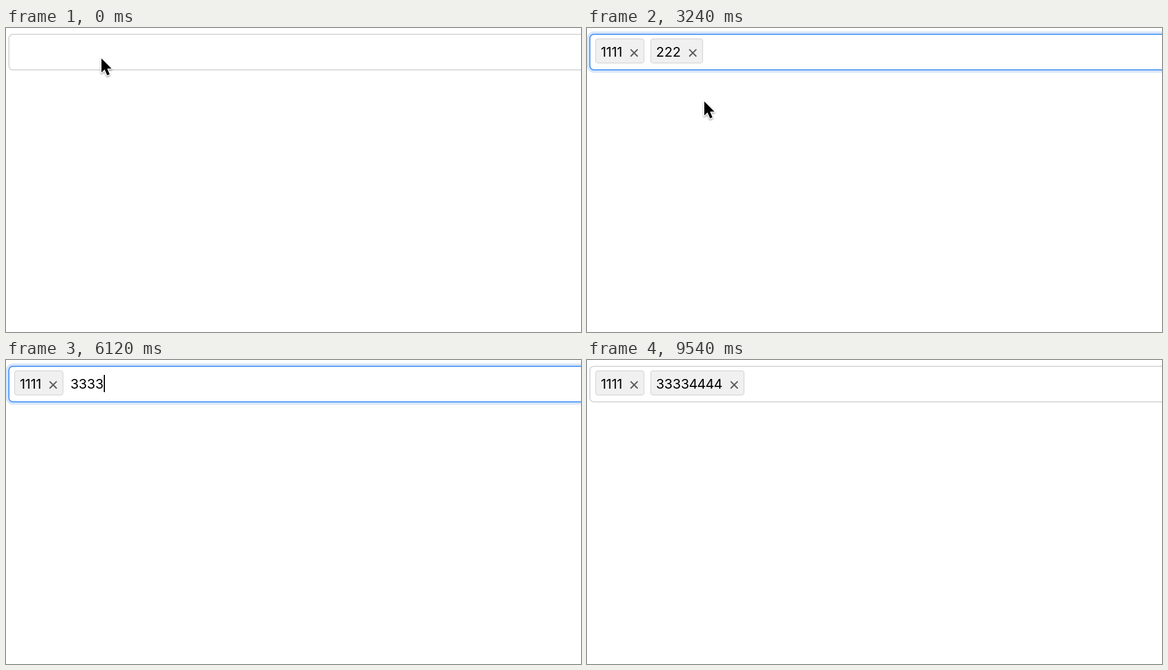
An HTML page that plays this animation: 1000x530 px, repeating every 9660 ms.

```html
<!DOCTYPE html>
<html lang="en">
<head>
<meta charset="utf-8">
<title>Tag input</title>
<style>
  html, body { margin: 0; width: 100%; height: 100%; overflow: hidden; background: #fff; }
  svg { display: block; }
  text { font: 400 23.5px Inter, Roboto, sans-serif; text-anchor: middle; fill: #000; }
  .tag rect { fill: #f0f0f0; stroke: #e0e0e0; stroke-width: 2; }
  .tag path { stroke: #5c5c5c; stroke-width: 2.2; fill: none; }
  #cursor { filter: drop-shadow(0 2px 1.5px rgba(0, 0, 0, .35)); }
</style>
</head>
<body>
<svg id="stage" width="1000" height="530" viewBox="0 0 1000 530">
  <rect id="glow" x="2" y="8" width="1100" height="68" rx="10" fill="none" stroke="#d9e6fa" stroke-width="4"/>
  <rect x="5" y="11" width="1100" height="62" rx="7" fill="#fff" stroke="#d9d9d9" stroke-width="2"/>
  <rect id="hover" x="5" y="11" width="1100" height="62" rx="7" fill="#fff" stroke="#4e9af4" stroke-width="2"/>
  <text id="typed" y="50"></text>
  <rect id="caret" width="2"/>
  <path id="cursor" d="M0 0V24.5L5.6 19.2L10 29.5L14.2 27.7L10 17.7H17.6Z"
        stroke="#fff" stroke-width="3" stroke-linejoin="round" paint-order="stroke"/>
</svg>
<script>
const LOOP = 9660, TICK = 60, BLINK = 500;
const NS = 'http://www.w3.org/2000/svg';
const $ = id => document.getElementById(id);

// Text typed one key per step, then committed with Enter
const ones = { text: '1111', at: 840, step: 160, commit: 1560 };
const twos = { text: '222', at: 2100, step: 180, commit: 2640 };
const threes = { text: '3333', at: 5640, step: 160, commit: 6300 };
const fours = { text: '4444', at: 7740, step: 120, commit: 8220 };
const entries = [ones, twos, threes, fours];

const focus = [{ from: 480, to: 3900 }, { from: 5220, to: 6660 }];
const edit = { from: 7500, to: fours.commit };
const hover = { from: 300, to: 8760 };
const CLOSE = 4380;

const moves = [
  { at: -1, ms: 1, x: 166, y: 53 },
  { at: 300, ms: 240, x: 163, y: 55 },
  { at: 3060, ms: 180, x: 204, y: 128 },
  { at: 3480, ms: 480, x: 179, y: 45 },
  { at: 4680, ms: 240, x: 235, y: 45 },
  { at: 6420, ms: 300, x: 180, y: 184 },
  { at: 6720, ms: 720, x: 171, y: 42 },
  { at: 8520, ms: 540, x: 228, y: 256 },
  { at: 9180, ms: 360, x: 86, y: 545 }
];

const presses = [...focus, edit].map(s => s.from).concat(
  entries.flatMap(e => [...e.text].map((_, i) => e.at + i * e.step).concat(e.commit)));

const ramp = (t, at, ms = 180) => Math.min(1, Math.max(0, (t - at) / ms));
const easeOut = k => 1 - (1 - k) ** 3;
const within = (t, s) => t >= s.from && t < s.to;
const fade = (t, s) => ramp(t, s.from) - ramp(t, s.to);
const typedBy = (t, e) => e.text.slice(0, Math.max(0, Math.floor((t - e.at) / e.step) + 1));
const show = (el, on) => el.setAttribute('visibility', on ? 'visible' : 'hidden');

function set(el, attrs) {
  for (const k in attrs) el.setAttribute(k, attrs[k]);
}
function add(parent, name, attrs = {}) {
  const el = document.createElementNS(NS, name);
  set(el, attrs);
  return parent.appendChild(el);
}

// Centres every digit in its advance and returns the end of the run
function setDigits(el, str, x, one) {
  const xs = [...str].map(c => {
    const w = c === '1' ? one : 14.4;
    x += w;
    return x - w / 2;
  });
  el.textContent = str;
  el.setAttribute('x', xs.join(' ') || x);
  return x;
}

function makeTag(left) {
  const g = add($('stage'), 'g', { class: 'tag' });
  $('stage').insertBefore(g, $('typed'));
  const box = add(g, 'rect', { x: left + 1, y: 19, height: 42, rx: 4 });
  const label = add(g, 'text', { y: 50 });
  const close = add(g, 'path', { d: 'M-6.2 -6.2L6.2 6.2M6.2 -6.2L-6.2 6.2' });
  return {
    g,
    draw(str) {
      const end = setDigits(label, str, left + 10, 9.4);
      const right = Math.round(end + 38.4);
      set(box, { width: right - left - 2 });
      set(close, { transform: `translate(${right - 18} 43.4)` });
      return { end, right };
    }
  };
}

const tagA = makeTag(14), tagB = makeTag(110);

function secondTag(t) {
  if (t >= threes.commit) return threes.text + typedBy(t, fours);
  return t >= twos.commit && t < CLOSE + 180 ? twos.text : '';
}

function drawText(t) {
  let start = 16, editEnd = 0;
  show(tagA.g, t >= ones.commit);
  if (t >= ones.commit) start = tagA.draw(ones.text).right + 12;

  const second = secondTag(t);
  show(tagB.g, second);
  if (second) {
    const { end, right } = tagB.draw(second);
    set(tagB.g, { opacity: t < threes.commit ? 1 - ramp(t, CLOSE) : 1 });
    start = right + 12;
    editEnd = end;
  }

  const open = entries.find(e => e !== fours && t >= e.at && t < e.commit);
  const inputEnd = setDigits($('typed'), open ? typedBy(t, open) : '', start, 11);

  const editing = within(t, edit);
  const idle = t - Math.max(...presses.filter(p => p <= t));
  set($('caret'), editing
    ? { x: Math.round(editEnd), y: 28, height: 27 }
    : { x: Math.round(inputEnd), y: 26, height: 30 });
  show($('caret'), (editing || focus.some(s => within(t, s))) && idle % (2 * BLINK) < BLINK);
}

// Typing hides the pointer until it moves again
function drawCursor(t) {
  const i = moves.findLastIndex(m => m.at < t);
  const to = moves[i], from = moves[i - 1] || to;
  const k = easeOut(ramp(t, to.at, to.ms));
  const x = from.x + (to.x - from.x) * k, y = from.y + (to.y - from.y) * k;
  set($('cursor'), { transform: `translate(${x} ${y})` });
  show($('cursor'), !entries.some(e => e.at > to.at && e.at <= t));
}

function render(t) {
  set($('glow'), { opacity: focus.reduce((sum, s) => sum + fade(t, s), 0) });
  set($('hover'), { opacity: fade(t, hover) });
  drawText(t);
  drawCursor(t);
}

const begin = performance.now();
function loop() {
  const t = Math.max(0, performance.now() - begin) % LOOP;
  render(Math.floor(t / TICK) * TICK);
  requestAnimationFrame(loop);
}
loop();
</script>
</body>
</html>
```
